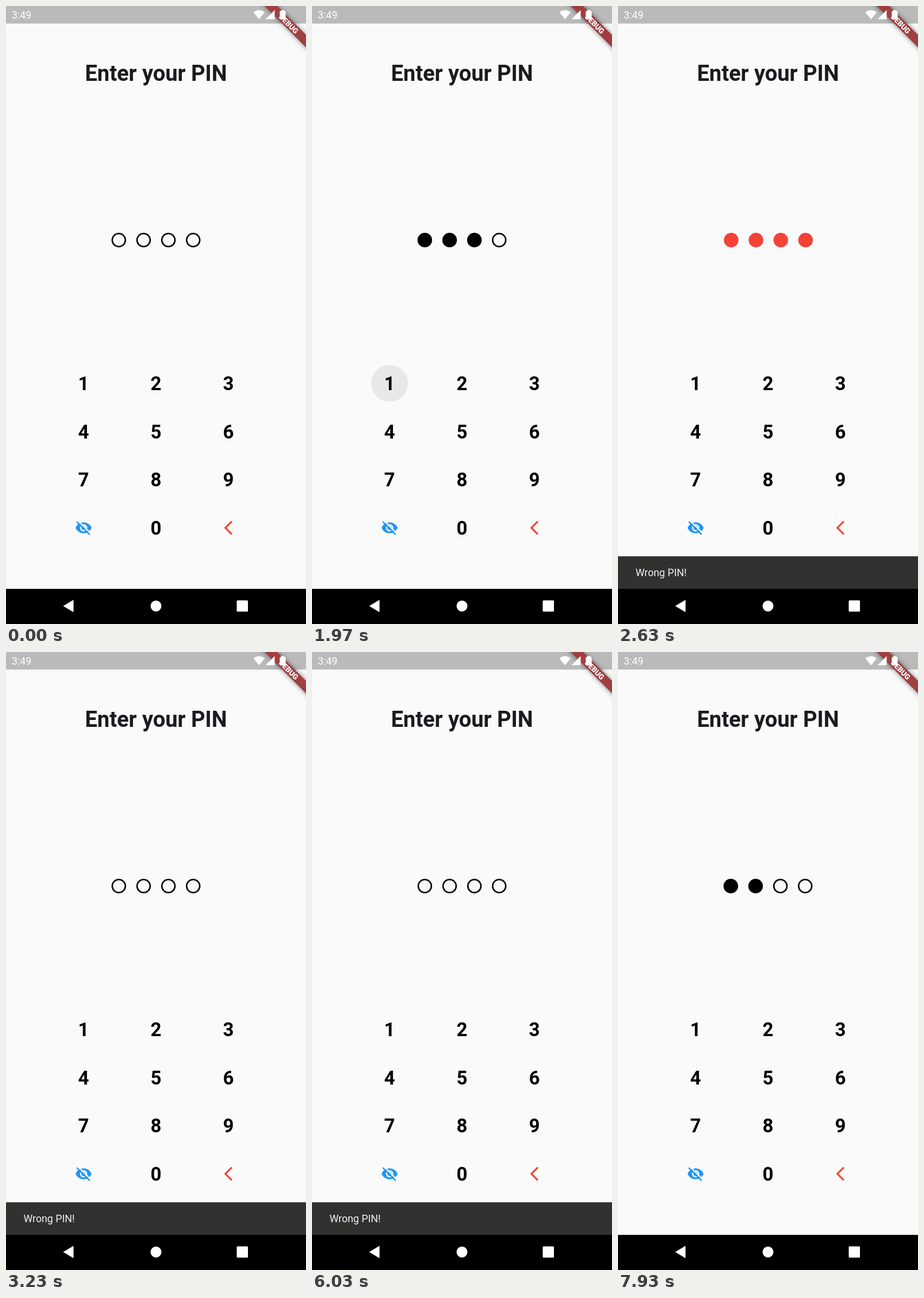
Recreate the animation shown at these times as an HTML page with a canvas. Size 522 px wide and 1073 px high, loop 8000 ms.

```html
<!DOCTYPE html>
<html lang="en">
<head>
<meta charset="utf-8">
<title>PIN entry</title>
<style>
  html, body { margin: 0; width: 100%; height: 100%; overflow: hidden; background: #fafafb; }
  canvas { display: block; width: 522px; height: 1073px; }
</style>
</head>
<body>
<canvas id="stage" width="522" height="1073"></canvas>
<script>
const ctx = document.getElementById('stage').getContext('2d');
const W = 522, H = 1073, LOOP = 8000, DP = W / 411.43;
const BG = '#fafafb', RED = '#f44336', BLUE = '#2196f3';
const NAV_TOP = 1012, BAR_H = 56.6;
const COLS = [135, 261, 387], ROW_Y = 655, ROW_GAP = 83.6;

// Release time of every tap on key 1
const TAPS = [1320, 1640, 1955, 2270, 7110, 7410];
const HOLD = 95, FADE = 200;
const SHAKE = { start: 2255, length: 500, cycles: 4, size: 10 * DP };
const SNACK = { start: 2272, end: 6522, length: 250 };

const clamp = v => Math.min(1, Math.max(0, v));

function bezier(a, b, u) {
  return 3 * a * u * (1 - u) ** 2 + 3 * b * u * u * (1 - u) + u ** 3;
}

function fastOutSlowIn(t) {
  let lo = 0, hi = 1;
  for (let i = 0; i < 24; i++) {
    const mid = (lo + hi) / 2;
    if (bezier(0.4, 0.2, mid) < t) lo = mid; else hi = mid;
  }
  return bezier(0, 1, lo);
}

const easeInCirc = t => 1 - Math.sqrt(1 - t * t);

function rect(x, y, w, h, color) {
  ctx.fillStyle = color;
  ctx.fillRect(x, y, w, h);
}

function disc(x, y, r, color) {
  ctx.fillStyle = color;
  ctx.beginPath();
  ctx.arc(x, y, r, 0, Math.PI * 2);
  ctx.fill();
}

function poly(points, color) {
  ctx.fillStyle = color;
  ctx.beginPath();
  points.forEach(([x, y]) => ctx.lineTo(x, y));
  ctx.closePath();
  ctx.fill();
}

function line(x1, y1, x2, y2, width, color) {
  ctx.strokeStyle = color;
  ctx.lineWidth = width;
  ctx.beginPath();
  ctx.moveTo(x1, y1);
  ctx.lineTo(x2, y2);
  ctx.stroke();
}

function text(str, x, y, size, weight, color, align = 'center') {
  ctx.font = `${weight} ${size}px Roboto, sans-serif`;
  ctx.textAlign = align;
  ctx.fillStyle = color;
  ctx.fillText(str, x, y);
}

function at(x, y, scale, draw) {
  ctx.save();
  ctx.translate(x, y);
  ctx.scale(scale, scale);
  draw();
  ctx.restore();
}

function hiddenEye() {
  ctx.fillStyle = BLUE;
  ctx.beginPath();
  ctx.moveTo(-11, 0);
  ctx.bezierCurveTo(-9.27, -4.39, -5, -7.5, 0, -7.5);
  ctx.bezierCurveTo(5, -7.5, 9.27, -4.39, 11, 0);
  ctx.bezierCurveTo(9.27, 4.39, 5, 7.5, 0, 7.5);
  ctx.bezierCurveTo(-5, 7.5, -9.27, 4.39, -11, 0);
  ctx.fill();
  disc(0, 0, 5, BG);
  disc(0, 0, 3, BLUE);
  line(-7.6, -9.9, 10.4, 8.1, 1.8, BG);
  line(-9.36, -8.36, 8.36, 9.36, 1.8, BLUE);
}

function backArrow() {
  poly([[11.67, -8.13], [9.9, -9.9], [0, 0], [9.9, 9.9], [11.67, 8.13], [3.54, 0]], RED);
}

function debugBanner() {
  ctx.save();
  ctx.translate(W, 0);
  ctx.rotate(Math.PI / 4);
  ctx.scale(DP, DP);
  ctx.save();
  ctx.shadowColor = 'rgba(0,0,0,.5)';
  ctx.shadowBlur = 8;
  rect(-50, 28, 100, 12, '#7d7d7f');
  ctx.restore();
  rect(-50, 28, 100, 12, 'rgba(183,28,28,.627)');
  text('DEBUG', 0.6, 37.7, 10.2, 900, '#fff');
  ctx.restore();
}

function statusIcons() {
  text('3:49', 10, 22, 17.8, 400, '#fff', 'left');
  ctx.beginPath();
  ctx.moveTo(440.3, 23);
  ctx.lineTo(430.5, 11);
  ctx.quadraticCurveTo(440.3, 3.5, 450, 11);
  ctx.fill();
  poly([[467.5, 7], [467.5, 23], [451.5, 23]], '#fff');
  rect(479, 7, 5, 3, '#fff');
  ctx.beginPath();
  ctx.roundRect(476.3, 8.6, 10.4, 14.6, 1.5);
  ctx.fill();
}

function navBar() {
  rect(0, NAV_TOP, W, H - NAV_TOP, '#000');
  poly([[99.5, 1041.7], [117.5, 1031], [117.5, 1052.4]], '#fff');
  disc(261, 1041.7, 9.5, '#fff');
  ctx.beginPath();
  ctx.roundRect(401.5, 1032, 19.5, 19.5, 1.5);
  ctx.fill();
}

function rippleLevel(t) {
  return Math.max(...TAPS.map(up => t < up
    ? clamp((t - up + HOLD) / 80)
    : 1 - clamp((t - up) / FADE)));
}

function keypad(t) {
  const level = rippleLevel(t);
  if (level > 0) disc(COLS[0], ROW_Y, 32, `rgba(25,25,60,${0.085 * level})`);
  for (let n = 1; n <= 10; n++) {
    const col = n === 10 ? 1 : (n - 1) % 3;
    const row = Math.floor((n - 1) / 3);
    text(n % 10, COLS[col], ROW_Y + 11.9 + row * ROW_GAP, 26 * DP, 700, '#000');
  }
  const y = ROW_Y + 3 * ROW_GAP + 0.2;
  at(COLS[0], y, DP, hiddenEye);
  at(379.5, y, 1.24, backArrow);
}

function pinDots(t) {
  const k = (t - SHAKE.start) / SHAKE.length;
  const wrong = k >= 0 && k < 1;
  const reset = SHAKE.start + SHAKE.length;
  const first = t < reset ? 0 : reset;
  const filled = wrong ? 4 : TAPS.filter(up => up >= first && up <= t).length;
  const dx = wrong ? SHAKE.size * Math.sin(k * SHAKE.cycles * Math.PI * 2) : 0;
  for (let i = 0; i < 4; i++) {
    const x = 261 + (i - 1.5) * 34 * DP + dx;
    if (i < filled) {
      disc(x, 406.4, 10 * DP, wrong ? RED : '#000');
    } else {
      ctx.strokeStyle = '#000';
      ctx.lineWidth = 2 * DP;
      ctx.beginPath();
      ctx.arc(x, 406.4, 9 * DP, 0, Math.PI * 2);
      ctx.stroke();
    }
  }
}

function snackBar(t) {
  const p = t < SNACK.end
    ? clamp((t - SNACK.start) / SNACK.length)
    : 1 - clamp((t - SNACK.end) / SNACK.length);
  if (p <= 0) return;
  const top = NAV_TOP - BAR_H * fastOutSlowIn(p);
  rect(0, top, W, NAV_TOP - top, '#313130');
  ctx.globalAlpha = easeInCirc(clamp((p - 0.72) / 0.28));
  text('Wrong PIN!', 30.5, top + 34.7, 14 * DP, 400, '#f3f0f4', 'left');
  ctx.globalAlpha = 1;
}

function draw(t) {
  rect(0, 0, W, H, BG);
  text('Enter your PIN', 261, 129.5, 30 * DP, 700, '#1b1b1f');
  pinDots(t);
  keypad(t);
  snackBar(t);
  rect(0, 0, W, 30.5, 'rgba(0,0,0,.26)');
  debugBanner();
  statusIcons();
  navBar();
}

const start = performance.now();
function tick() {
  draw((performance.now() - start) % LOOP);
  requestAnimationFrame(tick);
}
tick();
</script>
</body>
</html>
```
